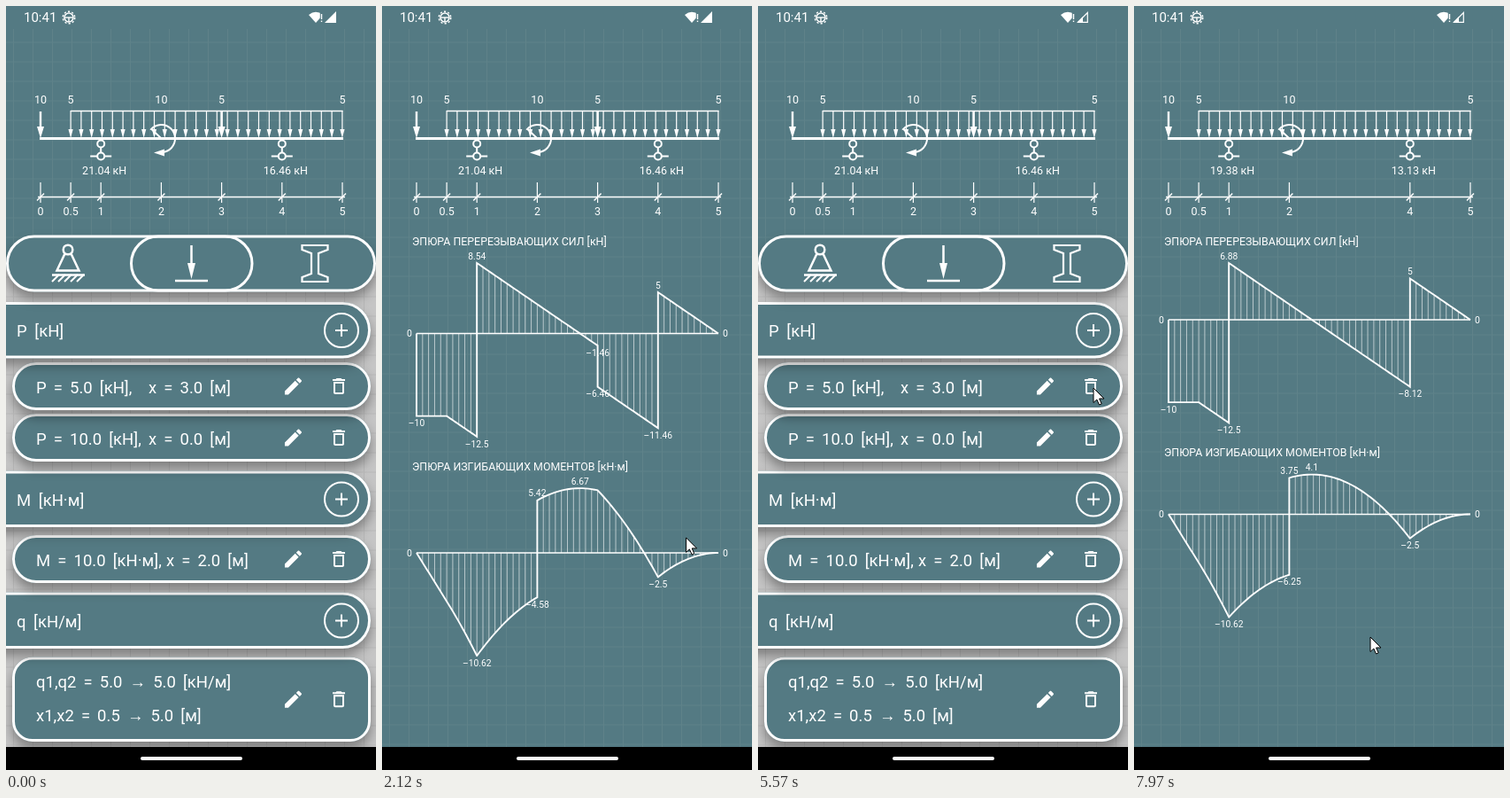
An HTML page with a canvas for the animation above (7990 ms loop, 418 by 862 pixels).

```html
<!DOCTYPE html>
<html lang="ru">
<meta charset="utf-8">
<style>
  html, body { margin: 0; height: 100%; overflow: hidden; background: #000 }
  canvas { display: block }
</style>
<canvas id="stage" width="418" height="862"></canvas>
<script>
const c = document.getElementById('stage').getContext('2d');
const LOOP = 7990, TEAL = '#547a83', WHITE = '#fff', NAV_TOP = 836;
const DELETED_AT = 6310, SIGNAL_DROP_AT = 4580, TRAVEL = 578;

// time, x, y of the pointer
const POINTER = [
  [590, 382, 395], [1110, 186, 266], [1260, 187, 267], [1730, 208, 615],
  [2040, 327, 596], [2070, 327, 596], [2210, 382, 609], [2610, 382, 609],
  [3330, 200, 822], [3510, 200, 822], [4200, 207, 303], [4950, 207, 303],
  [5570, 379, 431], [6590, 379, 431], [7150, 219, 264], [7280, 219, 264],
  [7800, 267, 712], [LOOP, 267, 712]
];
const PENCIL = new Path2D('M3 17.25V21h3.75L17.81 9.94l-3.75-3.75zM20.71 7.04c.39-.39.39-1.02 0-1.41l-2.34-2.34c-.39-.39-1.02-.39-1.41 0l-1.83 1.83 3.75 3.75z');
const TRASH = new Path2D('M6 19c0 1.1.9 2 2 2h8c1.1 0 2-.9 2-2V7H6zM8 9h8v10H8zM15.5 4l-1-1h-5l-1 1H5v2h14V4z');
const ARROW = new Path2D('M0 0V16.5L3.8 13 6.5 19 9.2 17.8 6.6 12H12Z');

const clamp = u => Math.min(1, Math.max(0, u));
const smooth = u => u * u * (3 - 2 * u);
const cubic = u => u < .5 ? 4 * u ** 3 : 1 - 4 * (1 - u) ** 3;
const glide = (t, start, length) => cubic(clamp((t - start) / length));
const pos = m => 39 + 68.2 * m;
// Halves round up, also when just missed
const round = v => Math.round(v * 100 + 1e-4) / 100;

function text(s, x, y, size = 12.5, align = 'center', gap = 0) {
  c.font = size + 'px Roboto, sans-serif';
  c.textAlign = align;
  c.wordSpacing = gap + 'px';
  c.fillStyle = WHITE;
  c.fillText(s, x, y + size * .355);
}

function line(width, ...p) {
  c.lineWidth = width;
  c.beginPath();
  for (let i = 0; i < p.length; i += 2) c.lineTo(p[i], p[i + 1]);
  c.stroke();
}

function poly(...p) {
  c.fillStyle = WHITE;
  c.beginPath();
  for (let i = 0; i < p.length; i += 2) c.lineTo(p[i], p[i + 1]);
  c.fill();
}

function ring(x, y, r, width, fill) {
  c.beginPath();
  c.arc(x, y, r, 0, 7);
  if (fill) { c.fillStyle = fill; c.fill(); }
  c.lineWidth = width;
  c.stroke();
}

function downArrow(x, top, tip, width, half, head) {
  line(width, x, top, x, tip - head + 1);
  poly(x - half, tip - head, x + half, tip - head, x, tip);
}

function icon(path, x, y, scale) {
  c.save();
  c.translate(x, y);
  c.scale(scale, scale);
  c.translate(-12, -12);
  c.fillStyle = WHITE;
  c.fill(path, 'evenodd');
  c.restore();
}

function grid(top, color) {
  c.strokeStyle = color;
  for (let x = 8.5; x < 418; x += 22) line(1, x, top, x, NAV_TOP);
  for (let y = top + 15; y < NAV_TOP; y += 22) line(1, 0, y, 418, y);
  c.strokeStyle = WHITE;
}

function statusBar(weak) {
  text('10:41', 20, 13, 15, 'left');
  ring(71, 13, 5, 1.6);
  c.setLineDash([2.2, 2.2]);
  ring(71, 13, 6.8, 1.4);
  c.setLineDash([]);
  line(1.4, 67, 13, 75, 13);
  line(1.4, 71, 13, 71, 18);
  c.fillStyle = WHITE;
  c.beginPath();
  c.moveTo(350, 19);
  c.lineTo(342, 10);
  c.quadraticCurveTo(350, 3.5, 358, 10);
  c.fill();
  c.strokeStyle = TEAL;
  line(3.5, 356.5, 8, 356.5, 19);
  c.strokeStyle = WHITE;
  line(1.4, 356.5, 9, 356.5, 15);
  line(1.4, 356.5, 16.5, 356.5, 18);
  if (!weak) return poly(360, 19, 373, 19, 373, 6);
  poly(360, 19, 367, 19, 367, 12);
  line(1.2, 361.5, 18.4, 372.3, 18.4, 372.3, 7.5, 361.5, 18.4);
}

function beam(force, r1, r2) {
  line(1.3, 73, 118.5, 380.5, 118.5);
  for (let i = 0; i <= 26; i++) downArrow(pos(.5) + i * 11.8, 118, 149, 1.2, 2.6, 10);
  line(3, 38, 149.5, 381, 149.5);
  downArrow(39, 119, 149, 2.4, 4, 13);
  if (force) downArrow(pos(3), 118, 149, 2.6, 4, 13);

  c.lineWidth = 2;
  c.beginPath();
  c.moveTo(175.5, 149.5);
  c.lineTo(165, 139.5);
  c.arc(175.5, 149.5, 15.5, -2.4, 1.5);
  c.stroke();
  poly(167, 165.5, 179, 161.5, 179, 169.5);

  for (const [m, r] of [[1, r1], [4, r2]]) {
    const x = pos(m);
    line(2, x, 155, x, 169);
    line(2, x - 12, 169.5, x + 12, 169.5);
    ring(x, 155.5, 4, 2, TEAL);
    ring(x, 169.5, 4, 2, TEAL);
    text(round(r) + ' кН', x + 4, 186);
  }
  for (const [m, s] of [[0, 10], [.5, 5], [2, 10], [5, 5]]) text(s, pos(m), 106);
  if (force) text(5, pos(3), 106);

  line(1.3, 36, 215.5, 383, 215.5);
  for (const m of [0, .5, 1, 2, 3, 4, 5]) {
    if (m === 3 && !force) continue;
    const x = pos(m);
    line(1.2, x, 199, x, 222);
    line(1.5, x - 4, 219.5, x + 4, 211.5);
    text(m, x, 232);
  }
}

// Draws one force diagram and returns where the next title goes
function diagram(title, y, f, scale, marks) {
  const knots = [0, .5, 1, 2, 3, 4, 5], pts = [];
  knots.slice(1).forEach((b, i) => {
    const a = knots[i];
    for (let k = 0; k <= 20; k++) {
      const m = Math.min(b - 1e-6, Math.max(a + 1e-6, a + (b - a) * k / 20));
      pts.push([m, f(m)]);
    }
  });
  const values = pts.map(p => p[1]);
  const zero = y + 24.7 + scale * Math.max(...values);
  const level = v => zero - v * scale;
  text(title, 34, y, 12.4, 'left');
  c.globalAlpha = .75;
  for (let i = 1; i < 50; i++) line(.8, pos(i / 10), zero, pos(i / 10), level(f(i / 10 + 1e-6)));
  c.globalAlpha = 1;
  line(1.5, 39, zero, 380, zero);
  line(1.9, 39, zero, ...pts.flatMap(([m, v]) => [pos(m), level(v)]), 380, zero);
  text(0, 31, zero, 10.5);
  text(0, 388, zero, 10.5);
  for (const m of marks) {
    const v = f(m);
    text(String(round(v)).replace('-', '–'), pos(m), level(v) + (v > 0 ? -8 : 8), 10.3);
  }
  return level(Math.min(...values)) + 33.5;
}

function diagrams(p, r1, r2) {
  const past = (m, a) => Math.max(0, m - a), on = (m, a) => m > a ? 1 : 0;
  const shear = m => -10 - 5 * past(m, .5) + r1 * on(m, 1) - p * on(m, 3) + r2 * on(m, 4);
  const moment = m => -10 * m - 2.5 * past(m, .5) ** 2 + r1 * past(m, 1) + 10 * on(m, 2)
    - p * past(m, 3) + r2 * past(m, 4);
  const e = 1e-9, peak = 1 + (r1 - 12.5) / 5;
  const next = diagram('ЭПЮРА ПЕРЕРЕЗЫВАЮЩИХ СИЛ [кН]', 265.3, shear, 9.31,
    [e, 1 - e, 1 + e, ...(p ? [3 - e, 3 + e] : []), 4 - e, 4 + e]);
  diagram('ЭПЮРА ИЗГИБАЮЩИХ МОМЕНТОВ [кН·м]', next, moment, 10.93,
    [1, 2 - e, 2 + e, peak, 4]);
}

function pill(x, y, w, h, r) {
  c.save();
  c.shadowColor = 'rgba(0,0,0,.36)';
  c.shadowBlur = 13;
  c.shadowOffsetY = 8;
  c.fillStyle = TEAL;
  c.beginPath();
  c.roundRect(x, y, w, h, r);
  c.fill();
  c.restore();
  c.lineWidth = 3;
  c.beginPath();
  c.roundRect(x + 1.5, y + 1.5, w - 3, h - 3, r - 1.5);
  c.stroke();
}

function header(y, label) {
  pill(-60, y - 32, 472, 63.5, 31.7);
  text(label, 12, y + .5, 18.5, 'left', 4);
  ring(379, y, 19, 2);
  line(2, 372, y, 386, y);
  line(2, 379, y - 7, 379, y + 7);
}

function item(y, h, r, parts) {
  pill(7, y - h / 2, 405, h, r);
  for (const [s, x, dy] of parts) text(s, x, y + dy, 18.5, 'left', 3.5);
  icon(PENCIL, 324.5, y, 1.06);
  icon(TRASH, 376, y, 1);
}

function tabs() {
  pill(0, 258.5, 418, 64, 32);
  c.lineWidth = 3;
  c.beginPath();
  c.roundRect(141.5, 260, 136.5, 61, 30.5);
  c.stroke();

  line(2.5, 66.5, 279.5, 57.5, 298.5, 82.5, 298.5, 73.5, 279.5);
  ring(70, 275, 5.3, 2.5);
  line(2.5, 52, 303.5, 89, 303.5);
  for (let x = 60; x <= 88; x += 7) line(2, x, 303, x - 8, 311);

  downArrow(209.5, 270, 308, 2.5, 4.5, 18);
  line(2.5, 191, 310, 228, 310);

  line(2.2, 334.5, 270, 363.5, 270, 363.5, 275, 353, 279, 353, 302, 363.5, 306, 363.5, 311,
    334.5, 311, 334.5, 306, 345, 302, 345, 279, 334.5, 275, 334.5, 269);
}

function sheet(offset, force) {
  const up = force ? 0 : 58;
  c.save();
  c.translate(0, offset);
  c.fillStyle = '#c5c5c5';
  c.fillRect(0, 291, 418, 545);
  grid(291, '#b9b9b9');
  // Bottom to top, so that each shadow falls on the row below
  item(782.3 - up, 95.5, 23, [['q1,q2 = 5.0 → 5.0 [кН/м]', 34, -20], ['x1,x2 = 0.5 → 5.0 [м]', 34, 18]]);
  header(693.5 - up, 'q [кН/м]');
  item(624 - up, 54, 27, [['M = 10.0 [кН·м],', 34, 1], ['x = 2.0 [м]', 181, 1]]);
  header(556.5 - up, 'M [кН·м]');
  item(487 - up, 54, 27, [['P = 10.0 [кН],', 34, 1], ['x = 0.0 [м]', 161, 1]]);
  if (force) item(429, 54, 27, [['P = 5.0 [кН],', 34, 1], ['x = 3.0 [м]', 161, 1]]);
  header(366, 'P [кН]');
  tabs();
  c.restore();
}

function pointer(t) {
  const i = POINTER.findIndex(k => k[0] > t);
  if (i < 1) return;
  const [t0, x0, y0] = POINTER[i - 1], [t1, x1, y1] = POINTER[i];
  const u = smooth((t - t0) / (t1 - t0));
  c.save();
  c.translate(x0 + (x1 - x0) * u, y0 + (y1 - y0) * u);
  c.fillStyle = WHITE;
  c.fill(ARROW);
  c.strokeStyle = '#000';
  c.lineWidth = 1;
  c.stroke(ARROW);
  c.restore();
}

function draw(t) {
  const force = t < DELETED_AT;
  const p = force ? 5 : 0;
  const r1 = 19.375 + p / 3, r2 = 13.125 + p * 2 / 3;
  const offset = TRAVEL * (glide(t, 1371, 557) - glide(t, 3593, 772) + glide(t, 7410, 557));
  c.fillStyle = TEAL;
  c.fillRect(0, 0, 418, 862);
  grid(26, '#5f8289');
  statusBar(t >= SIGNAL_DROP_AT);
  beam(force, r1, r2);
  diagrams(p, r1, r2);
  if (offset < TRAVEL - .1) sheet(offset, force);
  c.fillStyle = '#000';
  c.fillRect(0, NAV_TOP, 418, 26);
  c.fillStyle = WHITE;
  c.beginPath();
  c.roundRect(152, 847, 115, 4, 2);
  c.fill();
  pointer(t);
}

const begin = performance.now();
function tick(now) {
  draw(Math.max(0, now - begin) % LOOP);
  requestAnimationFrame(tick);
}
tick(begin);
</script>
</html>
```
